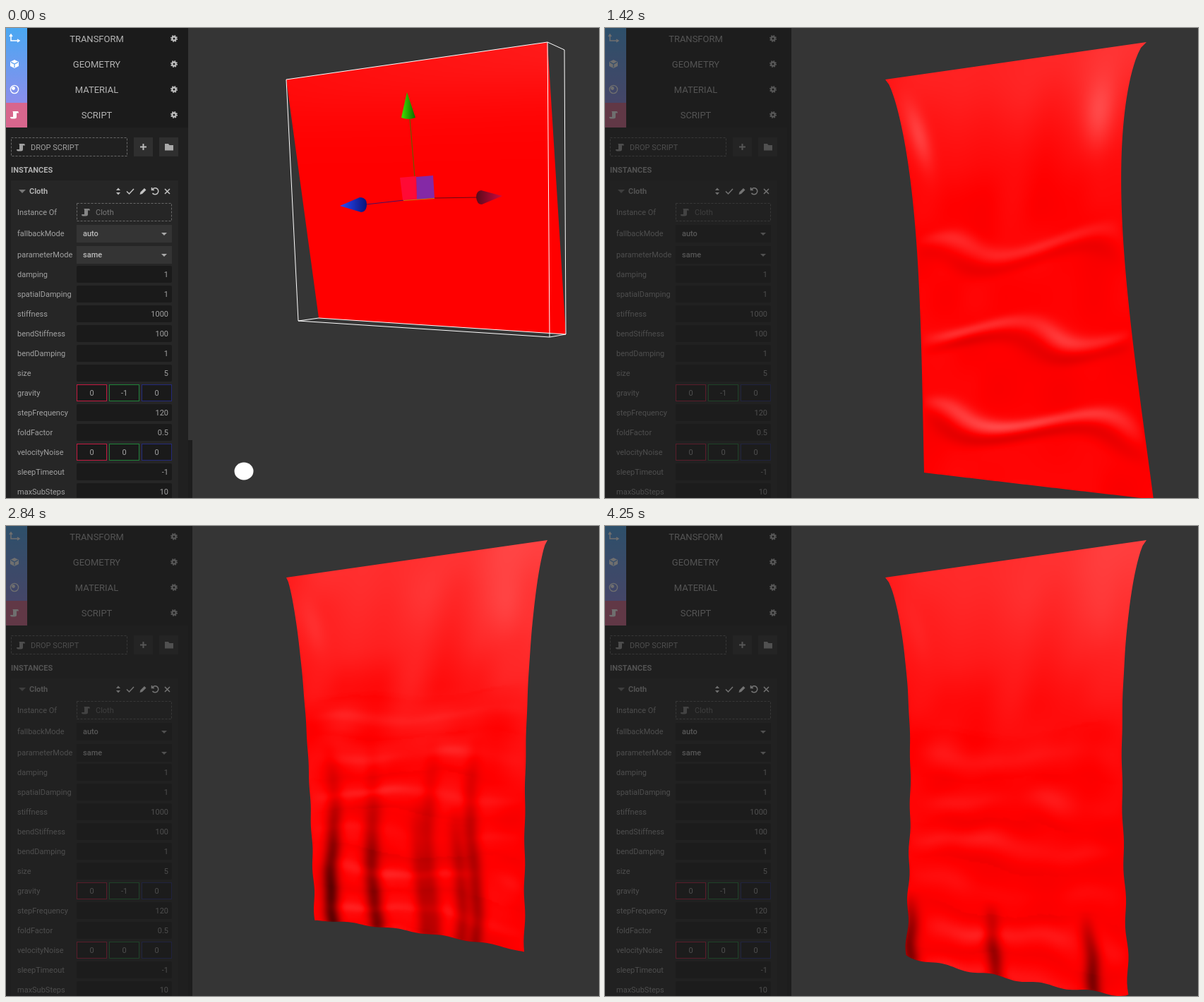
Animation of 840x666 px, one loop 4.35 s. Source, as an HTML page with a canvas:

```html
<!DOCTYPE html>
<html lang="en">
<head>
<meta charset="utf-8">
<title>Cloth editor</title>
<style>
html, body { margin: 0; width: 100%; height: 100%; overflow: hidden; background: #353535; }
canvas, svg { position: absolute; left: 0; top: 0; width: 840px; height: 666px; }
text { font: 11px Roboto, sans-serif; fill: #a2a2a2; }
.head { font-size: 13px; fill: #b4b4b4; text-anchor: middle; }
.bold { font-weight: 700; fill: #b0b0b0; }
.mid { font-weight: 500; fill: #bcbcbc; }
.dim { fill: #787878; }
.end { text-anchor: end; }
.ctr { text-anchor: middle; }
.line { fill: none; stroke: #c4c4c4; stroke-width: 1.5; }
.dash { fill: none; stroke: #686868; stroke-dasharray: 3 2; }
.wire { fill: none; stroke: #fff; stroke-width: 1; }
.field { fill: #1a1a1a; }
.sel { fill: #343434; }
.shade { visibility: hidden; fill: rgba(30, 30, 30, .64); }
.play .shade { visibility: visible; }
.play .edit { visibility: hidden; }
.play .sel { fill: #1b1b1b; }
.play .tools { opacity: .5; }
</style>
</head>
<body>
<canvas id="stage" width="840" height="666"></canvas>
<svg id="ui" viewBox="0 0 840 666"></svg>
<script>
const LOOP = 4350, START = 470, STEPS = 32, STEP = 118.125;
const ui = document.getElementById('ui');
const ctx = document.getElementById('stage').getContext('2d');

// ---------- side panel ----------
const rect = (x, y, w, h, fill, more = '') => `<rect x="${x}" y="${y}" width="${w}" height="${h}" fill="${fill}" ${more}/>`;
const text = (x, y, s, cls = '') => `<text x="${x}" y="${y + 4}" class="${cls}">${s}</text>`;
const at = (x, y, s) => `<g transform="translate(${x} ${y})">${s}</g>`;
const path = (d, more = 'class="line"') => `<path d="${d}" ${more}/>`;

const gear = '<circle r="2.6" fill="none" stroke="#c0c0c0" stroke-width="2.2"/>' +
  '<circle r="4.2" fill="none" stroke="#c0c0c0" stroke-width="1.6" stroke-dasharray="1.7 1.6"/>';
const scroll = fill => path('M-3-5H4.5Q6-5 6-2.5H3V3Q3 5.5 0 5.5H-4Q-6 5.5-6 3H-2V-3Q-2-5-3-5Z', `fill="${fill}"`);
const tabIcons = [
  path('M-5-5V3H6M-7-3L-5-6L-3-3M4 1L7 3L4 5', 'fill="none" stroke="#fff" stroke-width="1.5"'),
  path('M0-6L6-3V3L0 6L-6 3V-3Z', 'fill="#fff"') + path('M-5-2.6L0 0L5-2.6M0 0V5', 'fill="none" stroke="#5a9ff0" stroke-width="1.2"'),
  '<circle r="5.6" fill="none" stroke="#fff" stroke-width="1.4"/><circle cx="-1.5" cy="-1.5" r="2.4" fill="#fff"/>',
  scroll('#fff')
];

function panel() {
  let s = rect(0, 0, 258, 666, '#1b1b1b') + rect(0, 141, 258, 525, '#202020') +
    rect(258, 0, 6, 666, '#1d1d1d') + rect(258, 0, 6, 584, '#353535', 'class="edit"') +
    rect(0, 0, 30, 106, 'url(#tabs)') + rect(0, 106, 30, 35, '#d8668d');
  ['TRANSFORM', 'GEOMETRY', 'MATERIAL', 'SCRIPT'].forEach((name, i) => {
    const y = 15 + i * 36;
    s += at(12, y, tabIcons[i]) + text(128.5, y + .7, name, 'head') + at(238, y, gear);
  });
  s += rect(7.5, 155.5, 164, 26, 'none', 'class="dash"') + at(21, 169, scroll('#a0a0a0')) + text(35, 169, 'DROP SCRIPT');
  s += rect(181, 155, 27, 27, '#2f2f2f') + path('M190 168.5H199M194.5 164V173', 'stroke="#bbb" stroke-width="2"');
  s += rect(217, 155, 27, 27, '#2f2f2f') + path('M225 164H230L231.5 166H237V173.5H225Z', 'fill="#aaa"');
  s += text(7, 200.5, 'INSTANCES', 'bold');
  s += rect(7, 216, 237, 450, '#262626') + path('M18 229H28L23 234Z', 'fill="#777"') + text(33, 231, 'Cloth', 'bold');
  s += text(16, 261, 'Instance Of') + rect(100.5, 248.5, 134, 25, 'none', 'class="dash"') +
    at(113, 261, scroll('#858585')) + text(127, 261, 'Cloth', 'dim');
  [['fallbackMode', 'auto'], ['parameterMode', 'same']].forEach(([label, value], i) => {
    const y = 291 + 30 * i;
    s += text(16, y, label) + rect(100, y - 12, 135, 25, '', 'class="sel"') + text(109, y, value, 'mid') +
      path(`M220 ${y - 1}h8l-4 4z`, 'fill="#aaa"');
  });
  const rows = { damping: 1, spatialDamping: 1, stiffness: 1000, bendStiffness: 100, bendDamping: 1, size: 5,
    gravity: [0, -1, 0], stepFrequency: 120, foldFactor: .5, velocityNoise: [0, 0, 0], sleepTimeout: -1, maxSubSteps: 10 };
  Object.entries(rows).forEach(([label, value], i) => {
    const y = 349 + i * 28;
    s += text(16, y, label);
    if (Array.isArray(value)) {
      value.forEach((v, j) => {
        const x = 100 + 46 * j;
        s += rect(x + .5, y - 11.5, 42, 23, '#1a1a1a', `stroke="${['#c21a40', '#1f8238', '#23297a'][j]}"`) + text(x + 21.5, y, v, 'ctr');
      });
    } else s += rect(100, y - 12, 135, 24, '', 'class="field" rx="2"') + text(230, y, value, 'end');
  });
  s += rect(0, 0, 264, 666, '', 'class="shade"');
  s += '<g class="tools">' +
    path('M156 230L159 226.5L162 230ZM156 233L159 236.5L162 233Z', 'fill="#bbb"') +
    path('M171 231.5L174.5 235L181 228') +
    path('M189.5 236L190.5 232.5L196 227L198.5 229.5L193 235Z', 'fill="#c4c4c4"') +
    path('M207.5 228.5A4.6 4.6 0 1 1 207.5 234M206.5 226V229.5H210') +
    path('M225 228L232 235M232 228L225 235') + '</g>';
  return s;
}

function gizmo() {
  const poly = (pts, fill) => `<polygon points="${pts}" fill="${fill}"/>`;
  const line = (d, c) => path(d, `fill="none" stroke="${c}" stroke-width="1.2"`);
  return '<g class="edit">' +
    path('M397 73L767 20L791 31L793 434L770 438L414 415ZM767 20L770 438M414 415L443 411L793 434', 'class="wire"') +
    line('M572 128L579 211', '#6b5a00') + line('M510 250L564 244', '#4a1060') + line('M606 241L668 240', '#6a0814') +
    poly('558,212 581,210 582,243 562,244', '#ff0a35') + poly('581,211 605,209 607,241 582,243', '#8429a6') +
    line('M563 244.5L607 241.5', '#c47a10') +
    path('M568 91L560 127Q570 131 580 127Z', 'fill="url(#up)"') +
    path('M473 252L501 240Q511 240 511 250Q511 260 503 261Z', 'fill="url(#left)"') +
    path('M703 238L673 230Q666 231 666 240Q667 250 674 250Z', 'fill="url(#right)"') +
    '<ellipse cx="337" cy="628" rx="13.5" ry="12.5" fill="#fff"/></g>';
}

const grad = (id, a, b, dir = '') => `<linearGradient id="${id}" ${dir}><stop stop-color="${a}"/><stop offset="1" stop-color="${b}"/></linearGradient>`;
ui.innerHTML = '<defs>' + grad('up', '#44e000', '#0c6a00') + grad('left', '#2a4cff', '#0a1478') +
  grad('right', '#5a0a1a', '#d00a40') + grad('tabs', '#4aa8f2', '#8b8eec', 'x2="0" y2="1"') + '</defs>' + panel() + gizmo();

// ---------- cloth ----------
const mix = (a, b, w) => a + (b - a) * w;
const clamp = (v, lo = 0, hi = 1) => Math.min(hi, Math.max(lo, v));
const smooth = p => p * p * (3 - 2 * p);
const bell = d => Math.exp(-d * d);
const rand = (i, j = 0) => { const s = Math.sin(i * 127.1 + j * 311.7 + 4) * 43758.5453; return s - Math.floor(s); };

function noise(x, y) {
  const i = Math.floor(x), j = Math.floor(y), p = smooth(x - i), q = smooth(y - j);
  return mix(mix(rand(i, j), rand(i + 1, j), p), mix(rand(i, j + 1), rand(i + 1, j + 1), p), q);
}

// step: when the pose is reached; ease: how it is reached
// lx, ly, rx, ry: bottom corners; pl, pr: how far the sides draw in
// arch: bend of the hem; glow, reach: light from the top
// pleats: cross bands (first, period, width, shadow offset); folds: upright shadows
const base = { pl: 0, pr: 0, arch: 0, ripple: 0, glow: .1, reach: .2, strain: 0, grain: 0, pleat: 0, patchy: 1,
  first: 0, period: 1, width: .2, shadow: .5, folds: [], depth: 0, from: 1, over: 0 };
const poses = [
  { step: 0, lx: 443, ly: 411, rx: 793, ry: 434 },
  { step: 5, ease: p => p * p, lx: 442, ly: 495, rx: 785, ry: 535, pl: 9, pr: -25, arch: -13, ripple: 2,
    glow: .18, strain: .12, grain: .04, pleat: .32, patchy: .2, first: .21, period: .145 },
  { step: 8, ease: p => .77 * p + .23 * p * p, lx: 452, ly: 630, rx: 777, ry: 668, pl: 22, pr: -39,
    glow: .19, strain: .18, grain: .05, pleat: .25, patchy: .3, first: .43, period: .207, width: .085, shadow: .18 },
  { step: 13, ease: p => 1 - (1 - p) ** 2, over: 70, lx: 468, ly: 690, rx: 725, ry: 740, pl: 20, pr: -25,
    glow: .24, strain: .14, grain: .06, pleat: .22, first: .336, period: .127, width: .15,
    folds: [.1, .34, .42, .55, .65, .87], depth: .62, from: .6 },
  { step: 17, ease: p => p, lx: 456, ly: 623, rx: 721, ry: 668, pl: 12, pr: -16, arch: -11, ripple: 2,
    glow: .23, reach: .3, strain: .08, grain: .08, pleat: .18, first: .42, period: .105, width: .15,
    folds: [.09, .3, .51, .69], depth: .7, from: .63 },
  { step: 23, ease: p => 1 - (1 - p) ** 2.6, lx: 434, ly: 546, rx: 737, ry: 591, pl: 11, pr: -16, arch: -4, ripple: 1,
    glow: .27, reach: .45, strain: .04, grain: .09, pleat: .05, first: .5, period: .13,
    folds: [.1, .28, .56, .76], depth: .72, from: .47 },
  { step: 32, ease: smooth, lx: 427, ly: 608, rx: 742, ry: 664, pl: 23, pr: -25, arch: 7, ripple: 2,
    glow: .24, reach: .32, strain: .03, grain: .05, pleat: .08, first: .47, period: .107,
    folds: [.03, .4, .83], depth: .5, from: .82 }
].map(p => ({ ...base, ...p }));

function blend(a, b, w) {
  const o = {};
  for (const k of ['lx', 'ly', 'rx', 'ry', 'pl', 'pr', 'arch', 'ripple']) o[k] = mix(a[k], b[k], w);
  return o;
}

function shape(s, drop) {
  const side = (x0, x1, pull, t) => mix(x0, x1, t) + pull * Math.sin(Math.PI * t ** .62) + s.ripple * t * t * Math.sin(50 * t);
  const y0 = s.ly + drop, y1 = s.ry + drop;
  const hem = u => mix(y0, y1, u) + s.arch * Math.sqrt(Math.sin(Math.PI * clamp(u, 0, .9999))) + s.ripple * Math.sin(Math.PI * 9 * u);
  const xl = y => side(397, s.lx, s.pl, clamp((y - 73) / (y0 - 73)));
  const xr = y => side(767, s.rx, s.pr, clamp((y - 20) / (y1 - 20)));
  return { hem, xl, xr, y0, y1 };
}

// light on the cloth at u (across), v (down)
function lightAt(s, u, v) {
  let sum = s.glow * (.45 + .55 * u) * bell(v / s.reach) + s.grain * (noise(u * 7 + v * 2, v * 9) - .45);
  sum += s.strain * (bell((u - .07 - .2 * (v - .14)) / .045) + bell((u - .89) / .07)) * bell((v - .15) / .08);
  if (s.pleat) {
    // bands crowd together near the hem while the cloth is still bunched
    const bunched = s.shadow === .5 && s.pleat > .3;
    const crowd = bunched ? 10 * Math.max(0, v - .72) : 0;
    const phase = (v - s.first) / s.period + crowd + .12 * Math.sin(u * 8 + v * 17);
    const wave = f => bell((f - Math.round(f)) / s.width);
    const patch = mix(1, 1.5 * noise(u * 6, Math.round(phase) * 3.3), s.patchy);
    const span = bunched ? 1 : 1 - ((u - .5) / .5) ** 6;
    const zone = phase < -.6 ? 0 : clamp(.5 + phase * .25) * span * patch;
    sum += s.pleat * zone * (wave(phase) - (crowd ? 1.1 : .5) * wave(phase - s.shadow));
  }
  const rise = smooth(clamp((v - s.from) / (1.001 - s.from)) ** .6);
  s.folds.forEach((f, i) => {
    sum -= s.depth * mix(.55, 1, rand(i, s.step)) * rise * bell((u - f - .015 * Math.sin(v * 12 + i)) / .036);
  });
  return sum;
}

const TW = 160, TH = 260;
const maps = poses.map(s => Float32Array.from({ length: TW * TH },
  (_, n) => lightAt(s, n % TW / (TW - 1), Math.floor(n / TW) / (TH - 1))));

const X0 = 392, Y0 = 16, W = 404, H = 650;
const buf = document.createElement('canvas');
buf.width = W; buf.height = H;
const bufCtx = buf.getContext('2d');
const img = bufCtx.createImageData(W, H);
const light = new Float32Array(TW * TH), hems = new Float32Array(257);

function drawCloth(step) {
  let k = 1;
  while (k < poses.length - 1 && step >= poses[k].step) k++;
  const a = poses[k - 1], b = poses[k], p = (step - a.step) / (b.step - a.step);
  const s = shape(blend(a, b, b.ease(p)), b.over * Math.sin(Math.PI * p));
  for (let i = 0; i < light.length; i++) light[i] = mix(maps[k - 1][i], maps[k][i], p);
  for (let i = 0; i < 257; i++) hems[i] = s.hem(i / 256);

  for (let j = 0; j < H; j++) {
    const y = Y0 + j + .5, l = s.xl(y), r = s.xr(y);
    for (let i = 0; i < W; i++) {
      const u = clamp((X0 + i + .5 - l) / (r - l)), top = 73 - 53 * u;
      const v = clamp((y - top) / (hems[Math.round(u * 256)] - top));
      const fx = u * (TW - 1.001), fy = v * (TH - 1.001), ix = fx | 0, iy = fy | 0, n = iy * TW + ix;
      const c = mix(mix(light[n], light[n + 1], fx - ix), mix(light[n + TW], light[n + TW + 1], fx - ix), fy - iy);
      const o = (j * W + i) * 4;
      img.data[o] = 255 * (1 + Math.min(0, c));
      img.data[o + 1] = img.data[o + 2] = 255 * clamp(c, 0, .36);
      img.data[o + 3] = 255;
    }
  }
  bufCtx.putImageData(img, 0, 0);

  ctx.fillStyle = '#353535';
  ctx.fillRect(0, 0, 840, 666);
  ctx.save();
  ctx.beginPath();
  ctx.moveTo(397, 73);
  const N = 80;
  for (let i = 0; i <= N; i++) { const y = mix(20, s.y1, i / N); ctx.lineTo(s.xr(y), y); }
  for (let i = N; i >= 0; i--) { const y = s.hem(i / N); ctx.lineTo(mix(s.xl(y), s.xr(y), i / N), y); }
  for (let i = N; i >= 0; i--) { const y = mix(73, s.y0, i / N); ctx.lineTo(s.xl(y), y); }
  ctx.clip();
  ctx.drawImage(buf, X0, Y0);
  ctx.restore();
}

// ---------- clock ----------
let shown = -2;
function frame() {
  const t = performance.now() % LOOP;
  const step = t < START ? -1 : Math.min(STEPS, Math.floor((t - START) / STEP));
  if (step !== shown) {
    shown = step;
    ui.setAttribute('class', step < 0 ? '' : 'play');
    drawCloth(Math.max(0, step));
  }
  requestAnimationFrame(frame);
}
frame();
</script>
</body>
</html>
```
